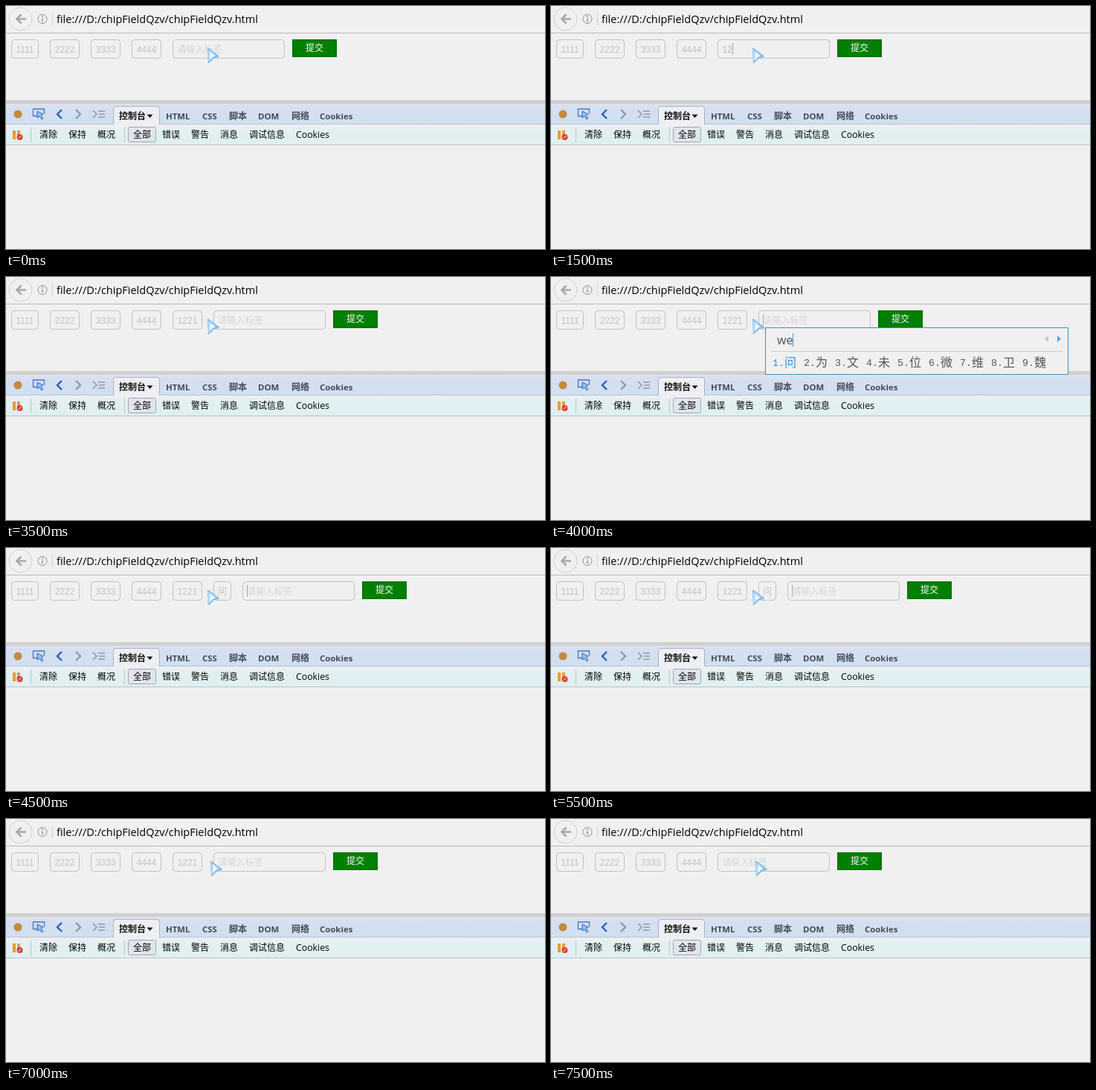
An HTML page that plays this animation: 725 px wide and 328 px high, repeating every 8000 ms.

```html
<!DOCTYPE html>
<html lang="zh-CN">
<head>
<meta charset="utf-8">
<style>
  html, body { margin: 0; width: 100%; height: 100%; overflow: hidden; background: #f0f0f0; }
  svg { display: block; width: 725px; height: 328px; }
  text { font: 12px "Open Sans", "Noto Sans CJK SC", "Noto Sans CJK", sans-serif; white-space: pre; }
  .url { font-size: 14.5px; }
  .tabs text { font-size: 11.4px; font-weight: 700; fill: #464b54; }
  .tabs .cjk { font-size: 12px; }
  .tools text { font-size: 12.3px; }
  .tools .cjk { font-size: 12px; }
  .field text { font-family: "Liberation Sans", "Noto Sans CJK SC", "Noto Sans CJK", sans-serif; }
  .box { fill: none; stroke: #c1c1c1; }
  .tag { fill: #c3c3c3; text-anchor: middle; }
  .line { fill: none; stroke-width: 2.4; }
  #ime .digit { font: 13.3px "Liberation Mono", monospace; }
  #ime .word { font-size: 16px; font-weight: 300; }
</style>
</head>
<body>
<svg viewBox="0 0 725 328">
  <defs>
    <linearGradient id="tabBar" x2="0" y2="1">
      <stop stop-color="#e0e0f0"/><stop offset=".3" stop-color="#d3dff0"/><stop offset="1" stop-color="#d0e0f0"/>
    </linearGradient>
    <linearGradient id="toolBar" x2="0" y2="1">
      <stop stop-color="#efeff3"/><stop offset=".35" stop-color="#e1f0f0"/><stop offset="1" stop-color="#dff0f0"/>
    </linearGradient>
    <linearGradient id="pointerFill" x2="1" y2=".3">
      <stop stop-color="#a9d2f6"/><stop offset=".45" stop-color="#d4eafb"/><stop offset="1" stop-color="#8fc4f0"/>
    </linearGradient>
  </defs>
  <rect width="725" height="328" fill="#f0f0f0"/>

  <!-- address bar -->
  <circle cx="19.500" cy="17.500" r="15.500" fill="#f0f0f0" stroke="#d0d0d0"/>
  <path d="M27 17.500H14.500M20.500 11.500l-6 6 6 6" fill="none" stroke="#a9a9a9" stroke-width="2.600"/>
  <circle cx="49" cy="17.500" r="6" fill="none" stroke="#909090"/>
  <path d="M49 13.500v2M49 16.700v4.300" stroke="#808080" stroke-width="1.300"/>
  <path d="M62.500 9v17" stroke="#d0d0d0"/>
  <text class="url" x="68" y="23">file:///D:/chipFieldQzv/chipFieldQzv.html</text>
  <path d="M0 36.500H725" stroke="#bababa"/>

  <!-- developer panel -->
  <rect y="127" width="725" height="5" fill="#d0d0d0"/>
  <rect y="132" width="725" height="28" fill="url(#tabBar)"/>
  <path d="M0 159.500H725" stroke="#b9c3d8"/>
  <rect y="160" width="725" height="28" fill="url(#toolBar)"/>
  <path d="M0 187.500H725" stroke="#c0c0d8"/>
  <path d="M144.500 160v-21q0-3.500 3.500-3.500h55q3.500 0 3.500 3.500v21" fill="#eeeff4" stroke="#a9b3c2"/>
  <circle cx="16" cy="146" r="5.500" fill="#c58a3c"/>
  <path d="M42 148.500h-5.500v-9.500h15v7" fill="none" stroke="#4a78bb" stroke-width="1.300"/>
  <path d="M42 142l8 4-3 1.500 3 4-2 1.500-3-4-3 2z" fill="#9cc0ee" stroke="#2f68bd"/>
  <path class="line" d="M75 140l-6 6 6 6" stroke="#2c60bb"/>
  <path class="line" d="M94 140l6 6-6 6" stroke="#9299a2"/>
  <path d="M117 141l5 5-5 5M124 142h9M125 146h8M124 150h9" fill="none" stroke="#9299a2" stroke-width="1.600"/>
  <g class="tabs" id="tabs"></g>
  <path d="M189.500 146.500h8l-4 4.500z" fill="#111"/>

  <path d="M9 168h4v12h-4zM15 168h4v12h-4z" fill="#e79b3c"/>
  <circle cx="18.500" cy="177" r="4" fill="#e03c32"/>
  <path d="M16.500 179l4-4" stroke="#fff"/>
  <path d="M33.500 164v20M159.500 164v20" stroke="#b9c3c8"/>
  <rect x="164.500" y="163.500" width="37" height="20" rx="2" fill="#e1e5ec" stroke="#a3a8b3"/>
  <g class="tools" id="tools"></g>

  <!-- tag editor -->
  <g class="field">
    <g id="tags"></g>
    <g id="entry">
      <rect class="box" x=".5" y="45.500" width="150" height="25" rx="4"/>
      <text id="value" x="6.500" y="63"></text>
      <path id="caret" d="M.5 50v16" stroke="#a9a9a9"/>
      <rect x="162" y="46" width="58" height="22" fill="#008000" stroke="#007200" stroke-width="2"/>
      <text x="179" y="61" fill="#fff">提交</text>
    </g>
  </g>

  <!-- input method popup -->
  <g id="ime">
    <rect x="288.500" y="68.500" width="407" height="63" fill="#f0f0f0" stroke="#3a92bd"/>
    <text x="304" y="91" fill="#555" style="font-size:16px">we</text>
    <path d="M325.500 76v18" stroke="#3c9ad0"/>
    <path d="M296 100.500H688" stroke="#cacaca"/>
    <path d="M669 79v9l-5-4.500z" fill="#c3c3c3"/>
    <path d="M681 79v9l5-4.500z" fill="#58a9df"/>
  </g>

  <g id="pointer" stroke-linejoin="round">
    <path d="M1 1L15.500 12l-6.500 1.500L2 20.500z" fill="url(#pointerFill)" stroke="#9fcdf3" stroke-width="1.500"/>
    <path d="M4.500 7l6 4.500-3.500 1.500-2.500 3z" fill="#f2f8fd"/>
    <path d="M1 1L15.500 12l-6.500 1.500L2 20.500" fill="none" stroke="#78b5ea" stroke-width="1.500"/>
  </g>
</svg>
<script>
const byId = id => document.getElementById(id);

function add(parent, name, attributes, content = '') {
  const node = document.createElementNS('http://www.w3.org/2000/svg', name);
  for (const key in attributes) node.setAttribute(key, attributes[key]);
  node.textContent = content;
  return parent.appendChild(node);
}

function addLabel(parent, label, x, y, fill) {
  const node = add(parent, 'text', { x, y, class: /\w/.test(label) ? '' : 'cjk' }, label);
  if (fill) node.style.fill = fill;
}

const tabs = [['控制台', 152], ['HTML', 215], ['CSS', 264], ['脚本', 300], ['DOM', 339], ['网络', 384], ['Cookies', 422]];
tabs.forEach(([label, x], i) => addLabel(byId('tabs'), label, x, 153, i ? '' : '#111'));

const tools = [['清除', 45], ['保持', 84], ['概况', 123], ['全部', 171], ['错误', 210], ['警告', 249], ['消息', 288], ['调试信息', 327], ['Cookies', 390]];
for (const [label, x] of tools) addLabel(byId('tools'), label, x, 178, '#000');

const tags = [['1111', 7, 37], ['2222', 59, 40], ['3333', 114, 40], ['4444', 169, 40], ['1221', 224, 40], ['问', 279, 24]]
  .map(([label, x, width]) => {
    const group = add(byId('tags'), 'g', {});
    add(group, 'rect', { class: 'box', x: x + .5, y: 45.5, width: width - 1, height: 25, rx: 4 });
    add(group, 'text', { class: 'tag', x: x + width / 2, y: 63 }, label);
    return group;
  });

[...'问为文未位微维卫魏'].forEach((word, i) => {
  const x = 298 + 42 * i, fill = i ? '#555' : '#2f93cc';
  add(byId('ime'), 'text', { class: 'digit', x, y: 120, fill }, `${i + 1}.`);
  add(byId('ime'), 'text', { class: 'word', x: x + 16, y: 121, fill }, word);
});

const LOOP = 8000;
const entryLeft = { 4: 224, 5: 279, 6: 318 };

// Each step: start time, number of tags, caret offset (0 hides it), typed text
const steps = [
  [0, 4, 0, ''], [500, 4, 6, ''], [1000, 4, 0, ''],
  [1500, 4, 20, '12'], [2000, 4, 34, '1221'], [2500, 4, 38, '1221 '],
  [3000, 5, 6, ''], [3500, 5, 0, ''], [4000, 5, 6, ''],
  [4500, 6, 6, ''], [5000, 6, 0, ''], [5500, 6, 6, ''], [6500, 6, 0, ''],
  [7000, 5, 0, ''], [7500, 4, 0, '']
];

function show(node, visible) {
  node.style.display = visible ? '' : 'none';
}

function draw(now) {
  const time = now % LOOP;
  const [, count, caret, typed] = steps.findLast(([start]) => start <= time);
  tags.forEach((tag, i) => show(tag, i < count));
  byId('entry').setAttribute('transform', `translate(${entryLeft[count]})`);
  byId('value').textContent = typed || '请输入标签';
  byId('value').setAttribute('fill', typed ? '#b9b9b9' : '#d6d6d6');
  show(byId('caret'), caret);
  byId('caret').setAttribute('transform', `translate(${caret})`);
  show(byId('ime'), time >= 4000 && time < 4500);
  byId('pointer').setAttribute('transform', `translate(${time < 6500 ? 270.5 : 274.5} 56)`);
}

const begin = performance.now();
function tick() {
  draw(performance.now() - begin);
  requestAnimationFrame(tick);
}
tick();
</script>
</body>
</html>
```
